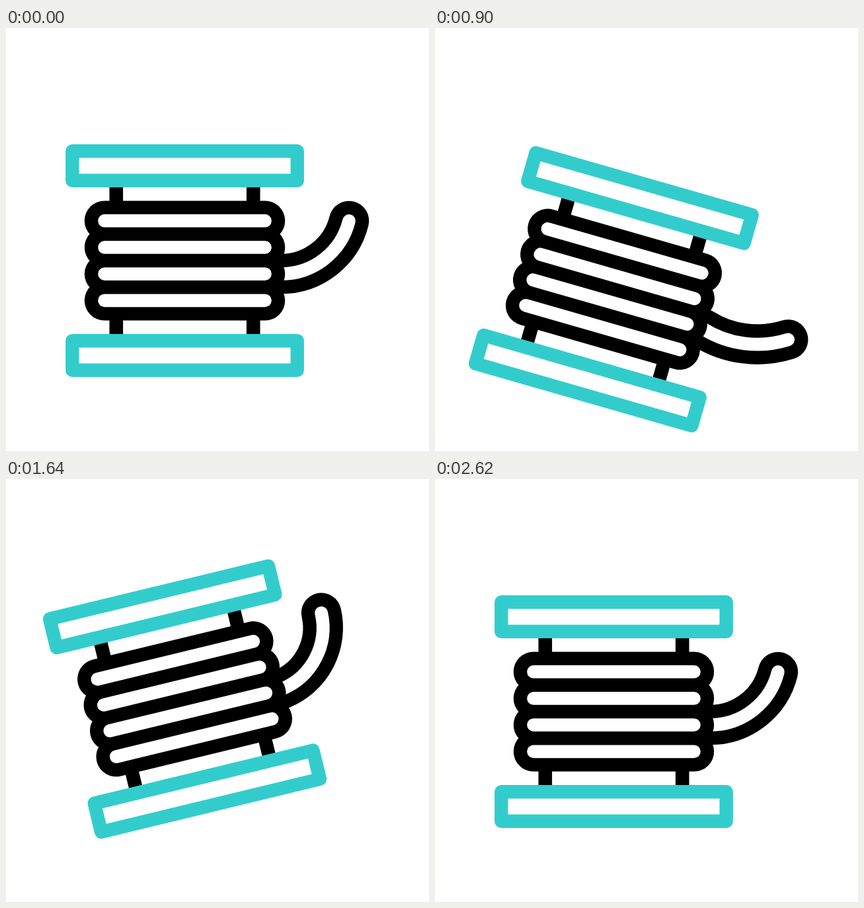
An HTML page with a canvas for the animation above (3000 ms loop, 640 px wide and 640 px high).

```html
<!DOCTYPE html>
<html lang="en">
<head>
<meta charset="utf-8">
<title>Cable reel</title>
<style>
  html, body { margin: 0; height: 100%; overflow: hidden; background: #fff; }
  canvas { display: block; }
</style>
</head>
<body>
<canvas id="stage" width="640" height="640"></canvas>
<script>
const ctx = document.getElementById('stage').getContext('2d');
const TEAL = '#33cccc', BLACK = '#000', WHITE = '#fff';
const LOOP = 3000, LAG = 2, START = 200, END = 2600;
const BORDER = 20.4, ROPE = 60.6, CORE = 19.8, ROW_GAP = 40.2;
const RAD = Math.PI / 180;

const ease = p => (1 - Math.cos(Math.PI * Math.min(1, Math.max(0, p)))) / 2;

// Eased swing from rest through the given [time, value] peaks and back to rest.
function swing(t, ...peaks) {
  let [time, value] = [START, 0], result = 0;
  for (const [nextTime, nextValue] of [...peaks, [END, 0]]) {
    result += (nextValue - value) * ease((t - time) / (nextTime - time));
    [time, value] = [nextTime, nextValue];
  }
  return result;
}

const shift = t => swing(t, [800, 50], [1395, -50], [2000, 38]);
const tilt = t => swing(t, [900, 16], [1600, -14], [2100, 11.8]);
const bend = t => swing(t, [850, 30], [1500, -15.5], [2050, 15.2]);

function stroke(color, width, cap = 'round') {
  ctx.strokeStyle = color;
  ctx.lineWidth = width;
  ctx.lineCap = cap;
  ctx.stroke();
}

function line(x1, y1, x2, y2, color, width, cap) {
  ctx.beginPath();
  ctx.moveTo(x1, y1);
  ctx.lineTo(x2, y2);
  stroke(color, width, cap);
}

// Circular arc with a fixed chord; the tip leads the bend and sets the curvature.
function drawTail(t) {
  const chord = (38 - bend(t)) * RAD;
  const tip = (76 - 1.5 * bend(t + 30)) * RAD;
  const root = 2 * chord - tip;
  const r = 65 / Math.sin(tip - chord);
  ctx.beginPath();
  ctx.arc(146 - r * Math.sin(root), 20 - r * Math.cos(root), r,
    Math.PI / 2 - root, Math.PI / 2 - tip, true);
  stroke(BLACK, ROPE);
  stroke(WHITE, CORE);
}

function drawCoils(color, width) {
  for (let row = 0; row < 4; row++) {
    const y = (row - 1.5) * ROW_GAP;
    line(-121.4, y, 121.4, y, color, width);
  }
}

function drawReel() {
  for (const side of [-1, 1]) line(side * 103.7, -115, side * 103.7, 115, BLACK, 20.6, 'butt');
  drawCoils(BLACK, ROPE);
  drawCoils(WHITE, CORE);
  ctx.lineJoin = 'round';
  for (const side of [-1, 1]) {
    ctx.beginPath();
    ctx.rect(-170.2, side * 143.5 - 22.3, 340.4, 44.6);
    stroke(TEAL, BORDER);
  }
}

// Three dashes fan out from a point inside the top left corner.
function drawSparks(t) {
  const head = ease((t - 1880) / 320), trail = ease((t - 1980) / 320);
  if (head - trail < 0.001) return;
  for (let i = -1; i <= 1; i++) {
    const angle = (225 + 34 * i) * RAD;
    const at = p => [-149.3 + (69.5 + 62 * p) * Math.cos(angle),
                     -148.1 + (69.5 + 62 * p) * Math.sin(angle)];
    line(...at(trail), ...at(head), TEAL, BORDER);
  }
}

function draw() {
  const t = performance.now() % LOOP - LAG;
  ctx.setTransform(1, 0, 0, 1, 0, 0);
  ctx.fillStyle = WHITE;
  ctx.fillRect(0, 0, 640, 640);
  ctx.translate(270.5, 352 + shift(t));
  ctx.rotate(tilt(t) * RAD);
  drawTail(t);
  drawReel();
  drawSparks(t);
  requestAnimationFrame(draw);
}
draw();
</script>
</body>
</html>
```
